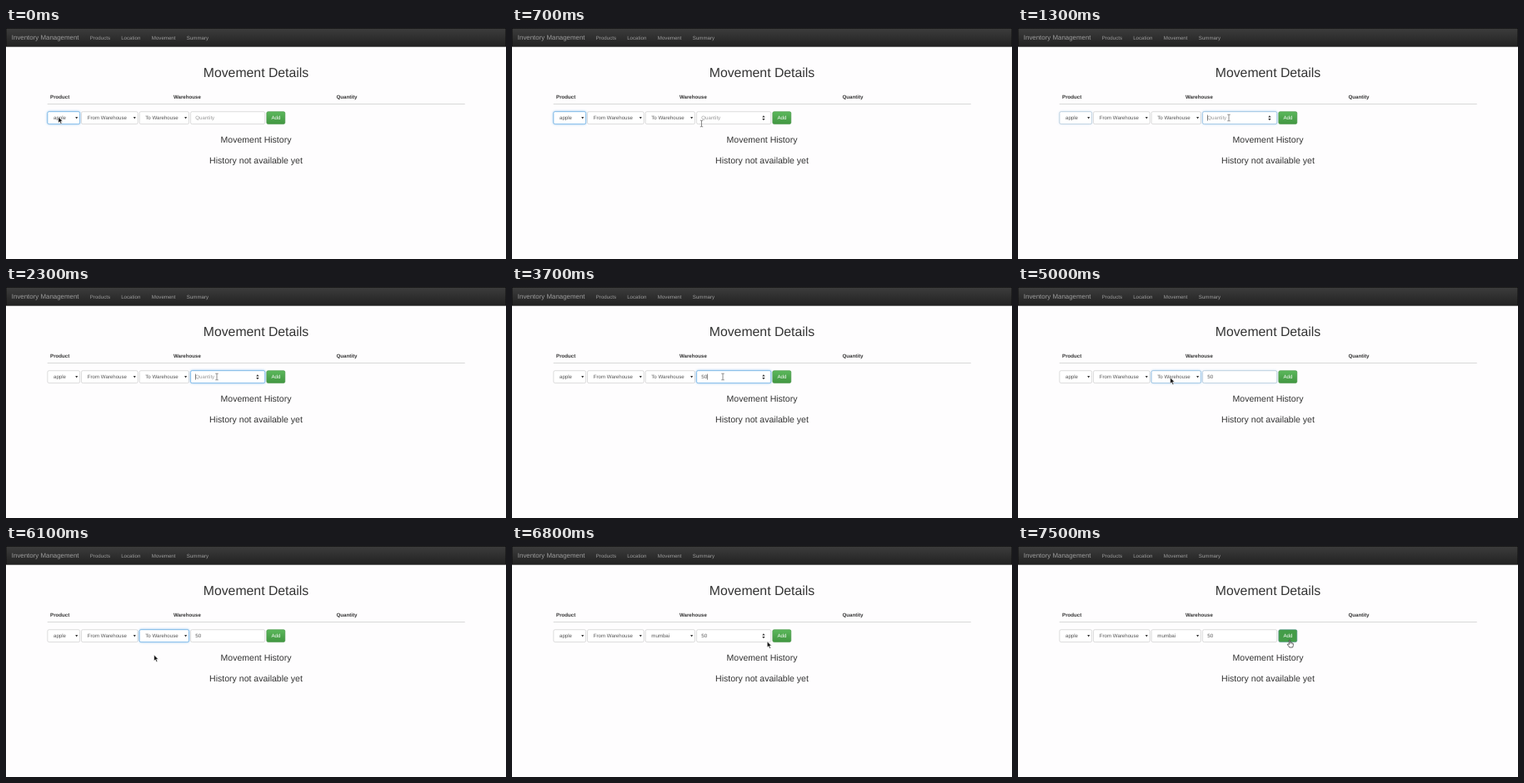
Animation of 600 by 278 pixels, one loop 8 s. Source, as an HTML page:

```html
<!DOCTYPE html>
<html lang="en">
<head>
<meta charset="utf-8">
<title>Inventory Management</title>
<style>
html, body { margin: 0; width: 100%; height: 100%; overflow: hidden; background: #fefdfe; }
svg { display: block; width: 600px; height: 278px; }
text { font: 6.15px "Liberation Sans", Arial, sans-serif; fill: #555; text-rendering: geometricPrecision; white-space: pre; }
.nav { fill: #9d9d9d; }
.brand { font-size: 7.905px; }
.title { font-size: 15.81px; fill: #333; text-anchor: middle; }
.sub { font-size: 10.54px; fill: #333; text-anchor: middle; }
.th { font-weight: bold; fill: #333; }
.box { fill: #fff; stroke: #c4c4c4; stroke-width: .6; }
.focus { fill: #fff; stroke: #66afe9; stroke-width: .7; filter: drop-shadow(0 0 1.7px rgba(102, 175, 233, .75)); }
.tri { fill: #333; }
</style>
</head>
<body>
<svg id="stage" viewBox="0 0 600 278">
  <defs>
    <linearGradient id="bar" x2="0" y2="1"><stop stop-color="#3c3c3c"/><stop offset="1" stop-color="#222"/></linearGradient>
    <linearGradient id="green" x2="0" y2="1"><stop stop-color="#5cb85c"/><stop offset="1" stop-color="#419641"/></linearGradient>
  </defs>
  <rect width="600" height="22.6" fill="#0c0c0c"/>
  <rect x=".5" y=".7" width="599" height="21.4" fill="url(#bar)"/>
  <text class="nav brand" x="6.8" y="14.2">Inventory Management</text>
  <text class="nav" x="100.8" y="13.8">Products</text>
  <text class="nav" x="138.2" y="13.8">Location</text>
  <text class="nav" x="174.8" y="13.8">Movement</text>
  <text class="nav" x="216.8" y="13.8">Summary</text>
  <text class="title" x="300" y="59">Movement Details</text>
  <text class="th" x="53.1" y="85.2">Product</text>
  <text class="th" x="201" y="85.2">Warehouse</text>
  <text class="th" x="396.5" y="85.2">Quantity</text>
  <rect x="49.7" y="91" width="501" height=".9" fill="#d4d4d4"/>
  <g id="form"></g>
  <text class="sub" x="300" y="138">Movement History</text>
  <text class="sub" x="300" y="163">History not available yet</text>
  <g id="arrow">
    <path d="M0 0V7.3L1.7 5.8L2.9 8.5L4.2 7.9L3 5.3H5.2Z" fill="#111" stroke="#fff" stroke-width=".6"/>
  </g>
  <g id="beam">
    <path d="M-1.7 -3.8H-.5Q0 -3.8 0 -3.2Q0 -3.8 .5 -3.8H1.7M0 -3.2V3.2M-1.7 3.8H-.5Q0 3.8 0 3.2Q0 3.8 .5 3.8H1.7" fill="none" stroke="#666" stroke-width=".75"/>
  </g>
  <g id="hand">
    <path d="M-.7 .4Q0 -.5 .7 .4V3.3Q1.6 2.8 2 3.6Q2.9 3.2 3.3 4Q4.2 3.8 4.3 4.8V6.5Q4.2 7.8 3.5 9H-.3Q-1.2 7.4 -2.6 5.8Q-2.7 4.6 -1.5 5L-.7 5.7Z" fill="#fff" stroke="#222" stroke-width=".7"/>
    <path d="M.8 3.4V5M2 3.8V5.2M3.2 4.2V5.4" stroke="#444" stroke-width=".4"/>
  </g>
</svg>
<script>
const LOOP = 8000, STEP = 100, TOP = 100.7, HEIGHT = 14.9;
const $ = id => document.getElementById(id);

function add(tag, attrs, text) {
  const el = document.createElementNS("http://www.w3.org/2000/svg", tag);
  for (const key in attrs) el.setAttribute(key, attrs[key]);
  if (text) el.textContent = text;
  return $("form").appendChild(el);
}

function field(x, right, textX, label, isSelect) {
  const box = { x, y: TOP, width: right - x, height: HEIGHT, rx: 1.76 };
  add("rect", { ...box, class: "box" });
  const focus = add("rect", { ...box, class: "focus" });
  if (isSelect) add("path", { class: "tri", d: `M${right - 5.4} 107.1h3l-1.5 2.4z` });
  return { focus, text: add("text", { x: textX, y: 110.3 }, label) };
}

const product = field(49.9, 88.6, 57, "apple", true);
field(90.5, 158.2, 97.8, "From Warehouse", true).focus.style.opacity = 0;
const target = field(160.2, 219.5, 167.3, "To Warehouse", true);
const quantity = field(221.6, 310.7, 227.3, "Quantity");
const caret = add("rect", { y: 104.6, width: .6, height: 7, fill: "#333" });
const spinner = add("path", { class: "tri", d: "M300.2 107.4l1.7-2.2 1.7 2.2zM300.2 109l1.7 2.2 1.7-2.2z" });
const button = add("rect", { x: 312.8, y: TOP, width: 22, height: HEIGHT, rx: 1.76, "stroke-width": .6 });
add("text", { x: 318.4, y: 110.3, style: "fill:#fff" }, "Add");

// Pointer stops: time, x, y
const path = [
  [0, 62.8, 107], [100, 66.5, 124], [200, 66.5, 124], [700, 227.5, 115],
  [1100, 253, 108], [4200, 253, 108], [4600, 182.7, 109], [6000, 182.7, 109],
  [6100, 177.6, 131], [6500, 177.6, 131], [6800, 306.2, 114.8], [7100, 326, 113]
];

function pointer(t) {
  const i = path.findIndex(p => p[0] > t);
  if (i < 0) return path[path.length - 1].slice(1);
  const [a, b] = [path[i - 1], path[i]], k = (t - a[0]) / (b[0] - a[0]);
  return [a[1] + (b[1] - a[1]) * k, a[2] + (b[2] - a[2]) * k];
}

// Fades over three steps beginning at the given time
const ramp = (t, start) => Math.min(1, Math.max(0, (t - start + STEP) / (3 * STEP)));
const between = (v, lo, hi) => v >= lo && v < hi;

function draw(t) {
  const [x, y] = pointer(t);
  const inRow = between(y, TOP, TOP + HEIGHT);
  const overInput = inRow && between(x, 221.6, 310.7);
  const overButton = inRow && between(x, 312.8, 334.8);
  const kind = overButton ? "hand" : overInput && x < 299 ? "beam" : "arrow";
  for (const id of ["arrow", "beam", "hand"]) {
    $(id).style.display = id === kind ? "" : "none";
    $(id).setAttribute("transform", `translate(${x} ${y})`);
  }

  product.focus.style.opacity = 1 - ramp(t, 1200);
  quantity.focus.style.opacity = ramp(t, 1200) - ramp(t, 4900);
  target.focus.style.opacity = ramp(t, 4900) - ramp(t, 6200);

  target.text.textContent = t < 6200 ? "To Warehouse" : "mumbai";
  const typed = t < 3200 ? "" : t < 3700 ? "5" : "50";
  quantity.text.textContent = typed || "Quantity";
  quantity.text.style.fill = typed ? "#555" : "#999";

  caret.setAttribute("x", 227.1 + typed.length * 3.42);
  const lit = between(t, 1200, 1700) || between(t, 2300, 2900) || between(t, 3200, 4300);
  caret.style.display = lit ? "" : "none";
  spinner.style.display = overInput || between(t, 1200, 4900) ? "" : "none";

  const pressed = between(t, 7400, 7500);
  button.setAttribute("fill", pressed ? "#398439" : overButton ? "#449d48" : "url(#green)");
  button.setAttribute("stroke", t >= 7500 ? "#4a8f86" : "#3e8f3e");
}

function tick(now) {
  draw(Math.floor(now % LOOP / STEP) * STEP);
  requestAnimationFrame(tick);
}
draw(0);
requestAnimationFrame(tick);
</script>
</body>
</html>
```
